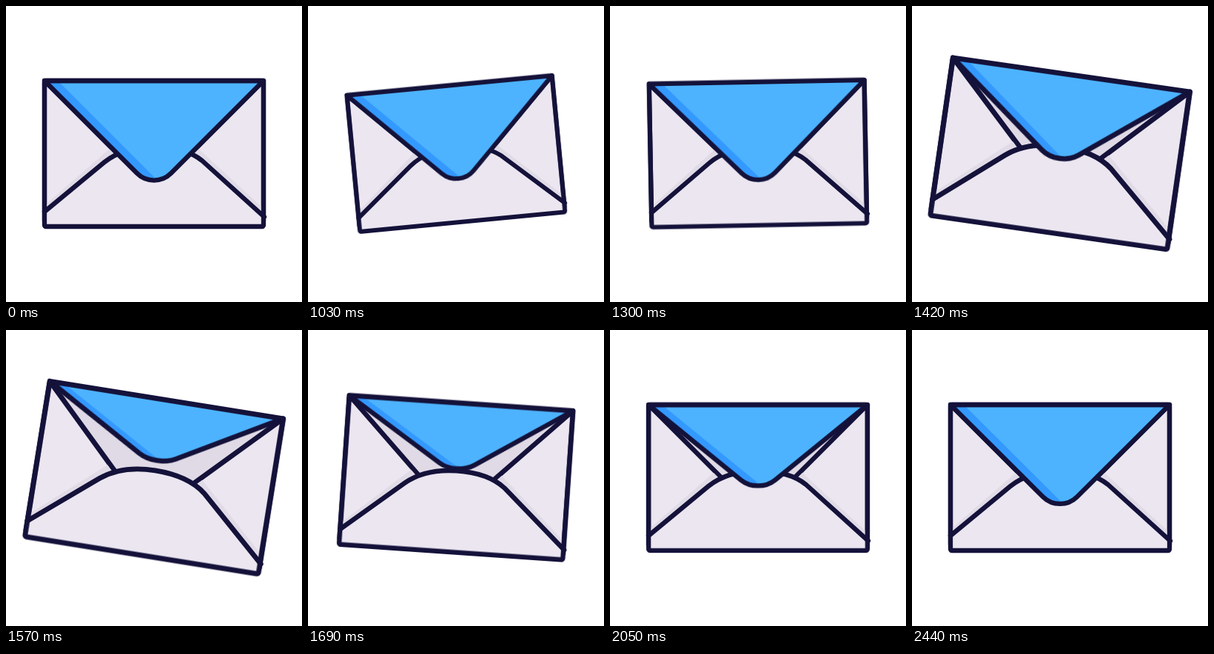
These frames come from a looping animation (400x400 px, 2.47 s). An HTML page without scripts:

```html
<!DOCTYPE html>
<html lang="en">
<head>
<meta charset="utf-8">
<title>Envelope</title>
<style>
  html, body { margin: 0; height: 100%; overflow: hidden; background: #fff; }
  svg { display: block; width: 100%; height: 100%; }

  .line { stroke: #14123a; stroke-width: 6.3; stroke-linecap: round; stroke-linejoin: round; }
  .paper { fill: #ebe6f0; }
  .inside { fill: #e0dae6; }
  .shade { fill: #e0dbe6; }
  .flap { fill: #4db3ff; }
  .fold { fill: #3399ff; transform-origin: 0 101px; }

  .envelope {
    transform-origin: 200px 200px;
    animation: swing 2470ms infinite, pulse 2470ms infinite;
  }
  .flap, .edge { animation: flap 2470ms linear infinite; }
  .fold { animation: fold 2470ms linear infinite; }

  @keyframes swing {
    0%, 41.69% { rotate: 0deg; }
    41.7% { rotate: -5.4deg; animation-timing-function: ease-out; }
    45.55% { rotate: -10deg; animation-timing-function: ease-in-out; }
    60.73% { rotate: 10deg; animation-timing-function: ease-in-out; }
    74.49%, 100% { rotate: 0deg; }
  }
  @keyframes pulse {
    0%, 41.69% { scale: 1; }
    41.7% { scale: .942; animation-timing-function: ease-out; }
    45.55% { scale: .87; animation-timing-function: ease-in-out; }
    60.32% { scale: 1.11; animation-timing-function: ease-in; }
    63.56% { scale: 1.08; animation-timing-function: cubic-bezier(.3, .4, .6, 1); }
    74.49% { scale: .991; animation-timing-function: ease-in-out; }
    85%, 100% { scale: 1; }
  }

  /* The outline is reshaped so that its stroke keeps an even width. */
  @keyframes flap {
    0%, 53.04% {
      d: path("M52 101L177 226C189.7 238.7 210.3 238.7 223 226L348 101Z");
      animation-timing-function: ease-in-out;
    }
    61.94% { d: path("M52 101L177 171C189.7 178.1 210.3 178.1 223 171L348 101Z"); }
    63.56% { d: path("M52 101L177 172.3C189.7 179.5 210.3 179.5 223 172.3L348 101Z"); }
    74.49% { d: path("M52 101L177 193C189.7 202.3 210.3 202.3 223 193L348 101Z"); }
    83% {
      d: path("M52 101L177 202.8C189.7 213.1 210.3 213.1 223 202.8L348 101Z");
      animation-timing-function: ease-in-out;
    }
    98.79% { d: path("M52 101L177 225.5C189.7 238.1 210.3 238.1 223 225.5L348 101Z"); }
    100% { d: path("M52 101L177 226C189.7 238.7 210.3 238.7 223 226L348 101Z"); }
  }
  @keyframes fold {
    0%, 53.04% { transform: scaleY(1); animation-timing-function: ease-in-out; }
    61.94% { transform: scaleY(.56); }
    63.56% { transform: scaleY(.57); }
    74.49% { transform: scaleY(.736); }
    83% { transform: scaleY(.814); animation-timing-function: ease-in-out; }
    98.79% { transform: scaleY(.996); }
    100% { transform: scaleY(1); }
  }
</style>
</head>
<body>
<svg viewBox="0 0 400 400">
  <g class="envelope">
    <rect class="inside" x="52" y="101" width="296" height="197" rx="2"/>

    <!-- side pockets -->
    <path class="paper line" d="M52 101L154 203L52 290Z"/>
    <path class="paper line" d="M348 101L246 203L348 290Z"/>
    <path class="shade" d="M55 267L140 193L150 203L55 278Z"/>
    <path class="shade" d="M345 271L260 193L250 203L345 282Z"/>

    <!-- bottom pocket -->
    <path class="paper" d="M52 278L133 211C150 197.500 172 190.500 200 190.500S249 196 265 209L349 285V298H52Z"/>
    <path class="line" fill="none" d="M52 278L133 211C150 197.500 172 190.500 200 190.500S249 196 265 209L349 285"/>

    <path class="flap" d="M52 101L177 226C189.700 238.700 210.300 238.700 223 226L348 101Z"/>
    <path class="fold" d="M52 101H70L204 235Q187 236 177 226Z"/>
    <path class="edge line" fill="none" d="M52 101L177 226C189.700 238.700 210.300 238.700 223 226L348 101Z"/>
    <rect class="line" fill="none" x="52" y="101" width="296" height="197" rx="2"/>
  </g>
</svg>
</body>
</html>
```
